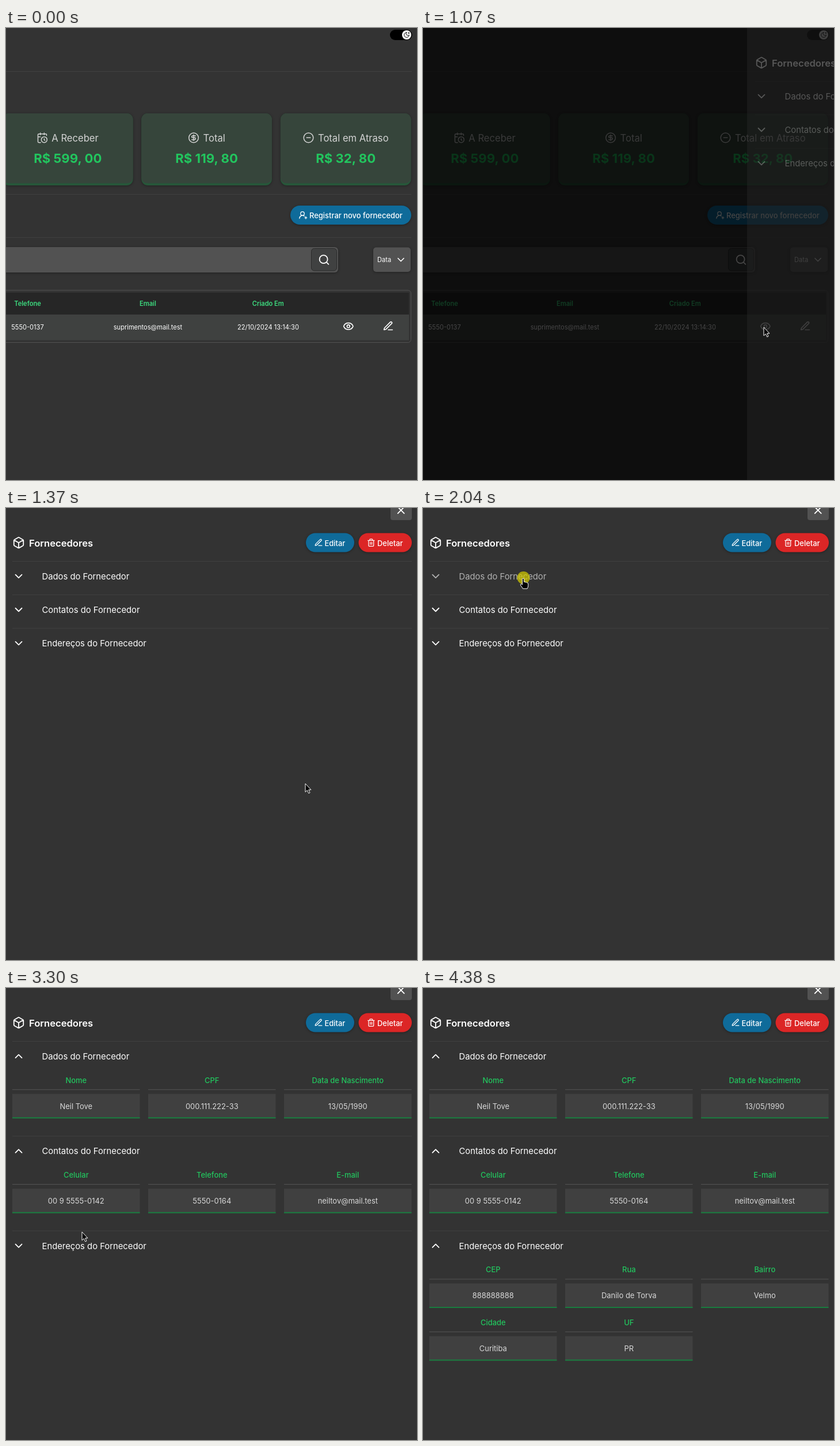
Write an HTML page that moves like this. It is 714 px wide and 784 px high and loops after 5.18 s.

```html
<!DOCTYPE html>
<html lang="pt-BR">
<head>
<meta charset="utf-8">
<title>Fornecedores</title>
<style>
html, body { margin: 0; width: 100%; height: 100%; overflow: hidden; background: #333; }
svg { display: block; width: 714px; height: 784px; }
text { font-family: Inter, "Open Sans", Arial, sans-serif; white-space: pre; }
.icon { fill: none; stroke-linecap: round; stroke-linejoin: round; }
.shadow { filter: drop-shadow(0 1px 2px rgba(0, 0, 0, .35)); }
</style>
</head>
<body>
<svg id="stage" viewBox="0 0 714 784" xmlns="http://www.w3.org/2000/svg"></svg>
<script>
const LOOP = 5180;
const XS = 11.09, SM = 12.94, BASE = 14.8, LG = 16.6, XL = 22.2;
const GREEN = '#22c55e';

const ICONS = {
  calendar: '<path d="M21 7.5V6a2 2 0 0 0-2-2H5a2 2 0 0 0-2 2v14a2 2 0 0 0 2 2h3.5M16 2v4M8 2v4M3 10h5M17.5 17.5 16 16.3V14"/><circle cx="16" cy="16" r="6"/>',
  dollar: '<circle cx="12" cy="12" r="10"/><path d="M16 8h-6a2 2 0 1 0 0 4h4a2 2 0 1 1 0 4H8M12 18V6"/>',
  minus: '<circle cx="12" cy="12" r="10"/><path d="M8 12h8"/>',
  userPlus: '<path d="M2 21a8 8 0 0 1 13.292-6M19 16v6M22 19h-6"/><circle cx="10" cy="8" r="5"/>',
  search: '<circle cx="11" cy="11" r="8"/><path d="m21 21-4.3-4.3"/>',
  chevron: '<path d="m6 9 6 6 6-6"/>',
  eye: '<path d="M2.062 12.348a1 1 0 0 1 0-.696 10.75 10.75 0 0 1 19.876 0 1 1 0 0 1 0 .696 10.75 10.75 0 0 1-19.876 0"/><circle cx="12" cy="12" r="3"/>',
  pencil: '<path d="M12 20h9M16.376 3.622a1 1 0 0 1 3.002 3.002L7.368 18.635a2 2 0 0 1-.855.506l-2.872.838a.5.5 0 0 1-.62-.62l.838-2.872a2 2 0 0 1 .506-.854z"/>',
  box: '<path d="M21 8a2 2 0 0 0-1-1.73l-7-4a2 2 0 0 0-2 0l-7 4A2 2 0 0 0 3 8v8a2 2 0 0 0 1 1.73l7 4a2 2 0 0 0 2 0l7-4A2 2 0 0 0 21 16ZM3.3 7l8.7 5 8.7-5M12 22V12"/>',
  trash: '<path d="M3 6h18M19 6v14c0 1-1 2-2 2H7c-1 0-2-1-2-2V6M8 6V4c0-1 1-2 2-2h4c1 0 2 1 2 2v2M10 11v6M14 11v6"/>',
  close: '<path d="M18 6 6 18M6 6l12 12"/>',
  moon: '<path d="M12 3a6 6 0 0 0 9 9 9 9 0 1 1-9-9ZM20 3v4M22 5h-4"/>'
};

const place = (cx, cy, size) =>
  `translate(${cx} ${cy}) scale(${size / 24}) translate(-12 -12)`;
const icon = (name, cx, cy, size, color = '#fff', width = 2, id = '') =>
  `<g class="icon" ${id && `id="${id}"`} stroke="${color}" stroke-width="${width}" transform="${place(cx, cy, size)}">${ICONS[name]}</g>`;
const text = (x, y, str, size, color = '#fff', weight = 400, anchor = 'start') =>
  `<text x="${x}" y="${y}" font-size="${size}" fill="${color}" font-weight="${weight}" text-anchor="${anchor}">${str}</text>`;
const centered = (x, y, str, size, color, weight) => text(x, y, str, size, color, weight, 'middle');
const rect = (x, y, w, h, fill, r = 0, more = '') =>
  `<rect x="${x}" y="${y}" width="${w}" height="${h}" rx="${r}" fill="${fill}" ${more}/>`;
const rule = (x, y, w, color = '#404040') => rect(x, y, w, 1, color);

function card(x, iconName, iconX, titleX, title, value) {
  const mid = x + 113.3;
  return `<g class="shadow">${rect(x, 148, 226.6, 125, '#27573a', 11)}
    <path d="M${x} 159a11 11 0 0 1 11-11h204.6a11 11 0 0 1 11 11v99q0 11-11 11.3H${x + 11}q-11-.3-11-11.3z" fill="#36453b"/></g>` +
    icon(iconName, iconX, 190.3, 20, '#d4d4d4', 1.8) +
    text(titleX, 197, title, LG, '#d4d4d4') +
    centered(mid, 234, value, XL, GREEN, 700);
}

function page() {
  const head = (x, s) => centered(x, 482, s, XS, '#3ddc7f', 600);
  const cell = (x, s) => centered(x, 522.6, s, XS, '#fff', 400);
  return rect(0, 0, 714, 784, '#333') +
    rect(667, 3, 38.5, 18, '#000', 9) +
    '<circle cx="696" cy="12" r="8" fill="#fff"/>' + icon('moon', 696, 12, 11.5, '#000') +
    rule(0, 75, 705) + rule(0, 288, 704) + rule(0, 363, 704) +
    card(-6, 'calendar', 63, 79.3, 'A Receber', 'R$ 599, 00') +
    card(235.3, 'dollar', 326, 342.6, 'Total', 'R$ 119, 80') +
    card(476.9, 'minus', 525.5, 542, 'Total em Atraso', 'R$ 32, 80') +
    rect(494, 308, 210, 33, '#0f6b9a', 16.5, 'class="shadow"') +
    icon('userPlus', 516.3, 324.5, 15.5) +
    text(527, 329.6, 'Registrar novo fornecedor', SM, '#fff', 500) +
    rect(-10, 380, 587, 44, '#525252', 6, 'class="shadow"') +
    rect(530.5, 382.5, 44, 38.5, '#404141', 5, 'stroke="#2a2a2a"') +
    icon('search', 552.5, 402, 21) +
    rect(638, 380.5, 65, 42.5, '#525252', 5, 'class="shadow"') +
    text(645, 406.3, 'Data', XS) + icon('chevron', 686, 402, 20) +
    rect(-10, 455, 713.5, 90.5, '#333', 5, 'stroke="#525252"') +
    rect(-10, 459, 710, 38, '#262626') + rect(-10, 497, 710, 44.5, '#3f4140') +
    head(37.5, 'Telefone') + head(246.5, 'Email') + head(455.3, 'Criado Em') +
    cell(37.5, '5550-0137') + cell(246.5, 'suprimentos@mail.test') + cell(455.5, '22/10/2024 13:14:30') +
    icon('eye', 594.8, 517.3, 19.5, '#fff', 2, 'eye') + icon('pencil', 664, 517, 19.5);
}

const SECTIONS = [
  ['Dados do Fornecedor', 106.3, [['Nome', 'Neil Tove'], ['CPF', '000.111.222-33'], ['Data de Nascimento', '13/05/1990']]],
  ['Contatos do Fornecedor', 106.3, [['Celular', '00 9 5555-0142'], ['Telefone', '5550-0164'], ['E-mail', 'neiltov@mail.test']]],
  ['Endereços do Fornecedor', 198, [['CEP', '888888888'], ['Rua', 'Danilo de Torva'], ['Bairro', 'Velmo'], ['Cidade', 'Curitiba'], ['UF', 'PR']]]
];

function field([label, value], i) {
  const x = 11 + (i % 3) * 236, y = Math.floor(i / 3) * 91.4, mid = x + 110.8;
  return centered(mid, y + 72.2, label, SM, GREEN, 500) +
    rule(x, y + 83.3, 221.5, '#555') +
    rect(x, y + 91.3, 221.5, 42.5, '#404040') + rect(x, y + 131.9, 221.5, 1.9, '#17803f') +
    centered(mid, y + 117.3, value, SM, '#d9d9d9');
}

const section = ([title, , fields], i) => `<g id="sec${i}">
  ${rule(11, -.4, 694)}
  <g id="head${i}">${text(62.5, 31.6, title, BASE)}${icon('chevron', 22, 26, 22, '#fff', 2, 'chev' + i)}</g>
  <clipPath id="clip${i}"><rect id="view${i}" y="56" width="714" height="0"/></clipPath>
  <g clip-path="url(#clip${i})">${fields.map(field).join('')}</g></g>`;

const panel = () => rect(-3, 0, 730, 784, '#333') +
  rect(668, -10, 37, 31, '#525252', 4) + icon('close', 686.2, 3.8, 22) +
  icon('box', 22, 60.2, 22) + text(40, 66.5, 'Fornecedores', LG, '#fff', 600) +
  rect(521, 43.5, 84, 33, '#0f6b9a', 16.5, 'class="shadow"') +
  icon('pencil', 543, 60, 15.5) + text(553.5, 65.5, 'Editar', SM, '#fff', 500) +
  rect(612.5, 43.5, 92.5, 33, '#dc2626', 16.5, 'class="shadow"') +
  icon('trash', 634.3, 60, 15) + text(645, 65.5, 'Deletar', SM, '#fff', 500) +
  SECTIONS.map(section).join('');

const pointer = `<g id="cursor" stroke="#fff" stroke-linejoin="round" fill="#000">
  <path id="arrow" stroke-width="1" d="M0 0V14.6L3.3 11.6 5.7 16.8 8 15.8 5.7 10.8H10z"/>
  <path id="hand" stroke-width="1" d="M-1.6 2.6a1.5 1.5 0 0 1 3 0V7.2q2-.6 2.6.7 2-.5 2.5.8 2.2-.3 2.2 1.6v3.4q0 2.6-1.6 5.2H-.6Q-1.6 16.6-4.4 13.2-5.4 11-3.6 10.8q1 0 2 1.4z"/></g>`;

const stage = document.getElementById('stage');
stage.innerHTML = page() +
  rect(0, 0, 714, 784, '#000', 0, 'id="shade"') +
  `<g id="panel">${panel()}</g>` +
  '<circle id="click" r="11" fill="#d2ca00" opacity=".72"/>' + pointer;
const el = id => document.getElementById(id);
const set = (id, name, value) => el(id).setAttribute(name, value);
const show = (id, on) => set(id, 'visibility', on ? 'visible' : 'hidden');

const TICKS = [
  [0, 0, 1], [70, 590, 9], [660, 870, 4], [1000, 1070, 2], [1170, 1170, 1],
  [1240, 1370, 3], [1420, 1750, 6], [1820, 2040, 4], [2170, 2300, 3],
  [2370, 2630, 5], [2910, 3300, 7], [3370, 3370, 1], [3440, 3660, 4],
  [3790, 3920, 3], [3990, 4250, 5], [4380, 4380, 1]
].flatMap(([a, b, n]) => Array.from({ length: n }, (_, i) =>
  n < 2 ? a : Math.round((a + (b - a) * i / (n - 1)) / 10) * 10));

const PATH = [
  [70, 655, 768], [330, 622, 618], [590, 598, 527], [730, 592, 519], [1170, 592, 519],
  [1370, 520, 478], [1550, 330, 290], [1750, 181, 132], [1820, 174, 121], [2300, 174, 121],
  [2370, 171, 158], [2500, 160, 250], [2630, 152, 285], [3040, 152, 285],
  [3300, 132, 423], [3370, 131, 437], [3440, 131, 446], [3920, 131, 446],
  [3990, 152, 455], [4120, 355, 528], [4250, 584, 603]
];
const SHIFT = [[1000, 717], [1070, 566], [1170, 205], [1240, 70], [1300, 16], [1370, 0]];
const FADE = [[1000, 0], [1070, .3], [1170, .76], [1240, .93], [1370, 1]];
const SHADE = [[1000, 0], [1070, .73], [1170, .8]];
const OPEN = [2170, 2910, 3790].map(t => [[t - 60, 0], [t, .35], [t + 70, .85], [t + 130, 1]]);
const HOVER = [[1820, 2370], [2500, 3110], [3440, 3990]];
const CLICKS = [[870, 1000], [2040, 2170], [2630, 2910], [3660, 3790]];

function track(keys, t, col = 1) {
  const i = keys.findIndex(k => k[0] > t);
  if (i === 0) return keys[0][col];
  if (i < 0) return keys[keys.length - 1][col];
  const a = keys[i - 1], b = keys[i];
  return a[col] + (b[col] - a[col]) * (t - a[0]) / (b[0] - a[0]);
}
const within = (t, [a, b]) => t >= a && t < b;

function draw(time) {
  const t = TICKS.filter(k => k <= time).pop();
  const x = track(PATH, t, 1), y = track(PATH, t, 2);
  const visible = within(t, [70, 4380]);
  const hand = HOVER.some(h => within(t, h));

  set('cursor', 'transform', `translate(${x} ${y})`);
  show('arrow', visible && !hand);
  show('hand', visible && hand);
  set('click', 'transform', `translate(${x + .5} ${y})`);
  show('click', CLICKS.some(c => within(t, c)));

  set('eye', 'transform', place(594.8, 517.3, within(t, [660, 1070]) ? 23.5 : 19.5));
  set('shade', 'opacity', track(SHADE, t));
  set('panel', 'opacity', track(FADE, t));
  set('panel', 'transform', `translate(${track(SHIFT, t)} 0)`);

  let top = 92.4;
  SECTIONS.forEach(([, height], i) => {
    const open = track(OPEN[i], t);
    set('sec' + i, 'transform', `translate(0 ${top})`);
    set('head' + i, 'opacity', within(t, HOVER[i]) ? .62 : 1);
    set('chev' + i, 'transform', `translate(22 26) rotate(${180 * open}) scale(${22 / 24}) translate(-12 -12)`);
    set('view' + i, 'height', height * open);
    top += 58.1 + height * open;
  });
}

const start = performance.now();
function tick() {
  draw((performance.now() - start) % LOOP);
  requestAnimationFrame(tick);
}
tick();
</script>
</body>
</html>
```
